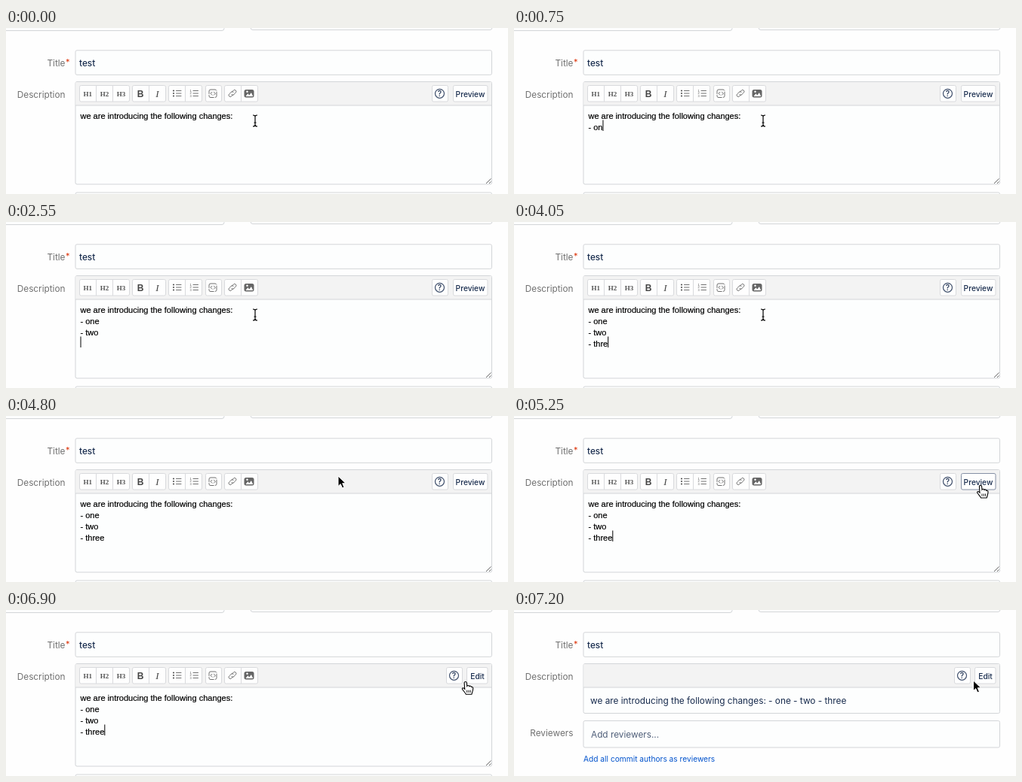
These frames come from a looping animation (665 px wide and 221 px high, 8000 ms). An HTML page:

```html
<!DOCTYPE html>
<html lang="en">
<head>
<meta charset="utf-8">
<title>Description editor</title>
<style>
  html, body { margin: 0; width: 100%; height: 100%; overflow: hidden; background: #fefefe; }
  svg { display: block; width: 665px; height: 221px; }
  text { font: 11.8px Inter, Roboto, sans-serif; fill: #172b4d; white-space: pre; }
  .label { fill: #707070; text-anchor: end; }
  .value { font-weight: 500; }
  .box { fill: #fdfefe; stroke: #d3d5d8; }
  .btn { fill: #fefefe; stroke: #d9dadd; }
  .btn.hover { stroke: #8590a5; }
  .btn.pressed { fill: #e4e7ec; stroke: #8590a5; }
  .btn-text { font-size: 10.2px; font-weight: 500; text-anchor: middle; }
  .typed { font: 11px "Liberation Sans", Arial, sans-serif; fill: #000; stroke: #000; stroke-width: .2; }
  .heading { font: bold 9px "Liberation Serif", Times, serif; fill: #555; text-anchor: middle; }
  .bold { font: bold 12px "Liberation Sans", Arial, sans-serif; fill: #444; text-anchor: middle; }
  .italic { font: italic 13px "Liberation Serif", Times, serif; fill: #444; text-anchor: middle; }
  .icon { fill: none; stroke: #707070; stroke-linecap: round; stroke-linejoin: round; }
  .tiny { font: 4px "Liberation Sans", Arial, sans-serif; fill: #555; }
  .placeholder { fill: #505f79; }
  .link { font-size: 10.2px; fill: #0052cc; }
</style>
</head>
<body>
<svg id="stage" viewBox="0 0 665 221"></svg>
<script>
const LOOP = 8000, TICK = 150, LINE = 15, LEFT = 98.5, FIRST_BASE = 120.5;
const BUTTON_TOP = 76.5, BUTTON_HEIGHT = 21.5;
const INTRO = 'we are introducing the following changes:';

const rect = (x, y, w, h, cls, r = 2, id = '') =>
  `<rect ${id && `id="${id}"`} x="${x}" y="${y}" width="${w}" height="${h}" rx="${r}" class="${cls}"/>`;
const label = (x, y, str, cls = '', id = '') =>
  `<text ${id && `id="${id}"`} x="${x}" y="${y}" class="${cls}">${str}</text>`;
const icon = d => `<path class="icon" d="${d}"/>`;
const button = (x, w, id) => rect(x, BUTTON_TOP, w, BUTTON_HEIGHT, 'btn', 2, id);

// A row of joined toolbar buttons, each 22px wide.
const buttons = (x, count) => {
  let out = button(x, 22 * count);
  for (let i = 1; i < count; i++) out += `<path class="btn" d="M${x + 22 * i} ${BUTTON_TOP}v${BUTTON_HEIGHT}"/>`;
  return out;
};

const rows = [83.5, 87, 90.5];
const listLines = x => icon(rows.map(y => `M${x} ${y}h6.5`).join(''));

const toolbar =
  buttons(97.5, 3) + [1, 2, 3].map(n => label(86 + 22.2 * n, 90.5, 'H' + n, 'heading')).join('') +
  buttons(167.5, 2) + label(178, 91.5, 'B', 'bold') + label(200.5, 91.5, 'I', 'italic') +
  buttons(215.5, 2) + listLines(225.5) +
  rows.map(y => `<circle cx="222" cy="${y}" r="1.1" fill="#555"/>`).join('') +
  listLines(248) + rows.map((y, i) => label(243.5, y + 1.4, i + 1, 'tiny')).join('') +
  button(264.5, 21) +
  '<rect x="269" y="82" width="10" height="10.5" rx="2" class="icon" stroke-dasharray="8 2"/>' +
  icon('M273 85.2l-2 2l2 2M275.4 85.2l2 2l-2 2') +
  buttons(289.5, 2) +
  icon('M299 85.5l2.3-2.4a2 2 0 0 1 3 3l-2.6 2.6a2 2 0 0 1-2.9 0M301 88.5l-2.3 2.4a2 2 0 0 1-3-3l2.6-2.6a2 2 0 0 1 2.9 0') +
  '<rect x="315.5" y="82" width="13" height="10.5" rx="2.5" fill="#666"/>' +
  '<path fill="#fff" d="M317.5 91l2.8-3.7l2 2.2l2.6-3.5l2.3 5z"/><circle cx="319.5" cy="84.8" r="1.2" fill="#fff"/>';

const help = `<g id="help">${button(564.5, 21)}
  <circle cx="574.5" cy="87.3" r="6" fill="none" stroke="#42526e" stroke-width="1.2"/>
  ${label(574.5, 91, '?', 'btn-text')}</g>`;

const cursors = `
  <g id="beam"><path d="M-3-7.5Q0-7.5 0-5.5V5.5Q0 7.5-3 7.5M3-7.5Q0-7.5 0-5.5M0 5.5Q0 7.5 3 7.5M-1.5 2.5h3"
    fill="none" stroke="#000" stroke-width="1.2"/></g>
  <g id="arrow"><path d="M0 0V13.5L3.2 10.6L5.5 15.8L7.9 14.8L5.7 9.7H10Z" fill="#000" stroke="#fff"/></g>
  <g id="hand"><path d="M-1.6 1.2C-1.6-.6 1.4-.6 1.6 1.2L2 5.5C2.6 4.3 4.8 4.6 5 5.9C5.8 5 7.6 5.5 7.7 6.9C8.8 6.3 10 7 10 8.5C10 12 9 13 8.2 16.5H.6C-.5 14-2.5 12.5-4.2 9.8C-5 8.4-3.2 7.4-2 8.6L-1 9.6Z"
    fill="#fff" stroke="#000" stroke-width="1.1"/><path d="M2 11v3.2M4.3 11v3.2M6.5 11v3.2" stroke="#000" stroke-width=".9"/></g>`;

document.getElementById('stage').innerHTML =
  rect(-10, -20, 299, 23.5, 'box', 3) + rect(324, -20, 320, 22.5, 'box', 3) +
  label(78.5, 50.7, 'Title', 'label') +
  '<text x="79" y="49" style="fill:#de350b;font-size:11px">*</text>' +
  rect(92, 29.8, 551.5, 32.5, 'box') + label(97, 50.5, 'test', 'value') +
  label(78.5, 92.7, 'Description', 'label') +
  rect(92, 71.5, 551.5, 136.5, 'box', 2, 'editor') +
  '<rect x="92.5" y="72" width="550.5" height="31" fill="#f3f3f3"/><path class="box" d="M92 103h551"/>' +
  `<g id="writing">${toolbar}
    <g id="lines">${[0, 1, 2, 3].map(i => label(LEFT, FIRST_BASE + LINE * i, '', 'typed')).join('')}</g>
    <rect id="caret" width="1" height="14.5"/>
    <path d="M636 207l6.5-6.5M640 207l2.5-2.5" stroke="#666" fill="none"/></g>` +
  label(101, 125, INTRO + ' - one - two - three', '', 'rendered') +
  help + button(592.5, 45.5, 'toggle') + label(615, 92, 'Preview', 'btn-text', 'toggleText') +
  `<g id="reviewers">${label(78.5, 168.2, 'Reviewers', 'label')}
    ${rect(92, 147.5, 551.5, 35.5, 'box')}${label(102, 169.7, 'Add reviewers...', 'placeholder')}
    ${label(92, 202.2, 'Add all commit authors as reviewers', 'link')}</g>` + cursors;

const el = id => document.getElementById(id);
const show = (id, on) => el(id).setAttribute('visibility', on ? 'visible' : 'hidden');
const move = (id, x, y) => el(id).setAttribute('transform', `translate(${x} ${y})`);
const lineEls = [...el('lines').children];
const pen = document.createElement('canvas').getContext('2d');
pen.font = '11px "Liberation Sans", Arial, sans-serif';

const typing = [
  [0, ''], [150, '\n'], [300, '\n-'], [450, '\n- '], [600, '\n- o'], [750, '\n- on'], [900, '\n- one'],
  [1050, '\n- one\n-'], [1350, '\n- one\n- '], [1500, '\n- one\n- t'], [1650, '\n- one\n- th'],
  [2250, '\n- one\n- tw'], [2400, '\n- one\n- two'], [2550, '\n- one\n- two\n'],
  [2850, '\n- one\n- two\n-'], [3150, '\n- one\n- two\n- '], [3450, '\n- one\n- two\n- th'],
  [4050, '\n- one\n- two\n- thre'], [4350, '\n- one\n- two\n- three']
];

const pointer = [
  [0, 'beam', 330, 123.5], [4650, 'beam', 352, 117], [4800, 'arrow', 440, 80], [4950, 'beam', 548, 50],
  [5100, 'arrow', 604, 66], [5250, 'hand', 618, 92.5], [5400, 'hand', 616, 94], [5550, 'hand', 613, 95],
  [5700, 'hand', 610, 95.7], [5850, 'hand', 608.7, 95.7], [7200, 'arrow', 608.5, 94]
];

const latest = (list, t) => list.filter(item => item[0] <= t).pop();
const within = (t, a, b) => t >= a && t < b;

function draw(time) {
  const t = Math.floor(time / TICK) * TICK;
  const previewing = t >= 7200, editLabel = t >= 6900;

  const lines = (INTRO + latest(typing, t)[1]).split('\n');
  lineEls.forEach((line, i) => { line.textContent = lines[i] || ''; });
  const last = lines.length - 1;
  el('caret').setAttribute('x', LEFT + pen.measureText(lines[last]).width);
  el('caret').setAttribute('y', FIRST_BASE + LINE * last - 13);
  const blinkOff = t < 150 || within(t, 4800, 5250) || within(t, 5850, 6300);
  el('caret').setAttribute('opacity', blinkOff ? 0 : 1);

  el('writing').setAttribute('display', previewing ? 'none' : 'inline');
  show('rendered', previewing);
  el('editor').setAttribute('height', previewing ? 66 : 136.5);
  move('reviewers', 0, previewing ? 0 : 71.5);

  move('help', editLabel ? 19 : 0, 0);
  const toggle = el('toggle');
  toggle.setAttribute('x', editLabel ? 610.5 : 592.5);
  toggle.setAttribute('width', editLabel ? 27.5 : 45.5);
  const state = within(t, 6750, 6900) ? ' pressed' : within(t, 5250, 6750) ? ' hover' : '';
  toggle.setAttribute('class', 'btn' + state);
  el('toggleText').textContent = editLabel ? 'Edit' : 'Preview';
  el('toggleText').setAttribute('x', editLabel ? 624.5 : 615);

  const [, shape, x, y] = latest(pointer, t);
  for (const id of ['beam', 'arrow', 'hand']) show(id, id === shape);
  move(shape, x, y);
}

const start = performance.now();
function frame() {
  draw((performance.now() - start) % LOOP);
  requestAnimationFrame(frame);
}
frame();
</script>
</body>
</html>
```
